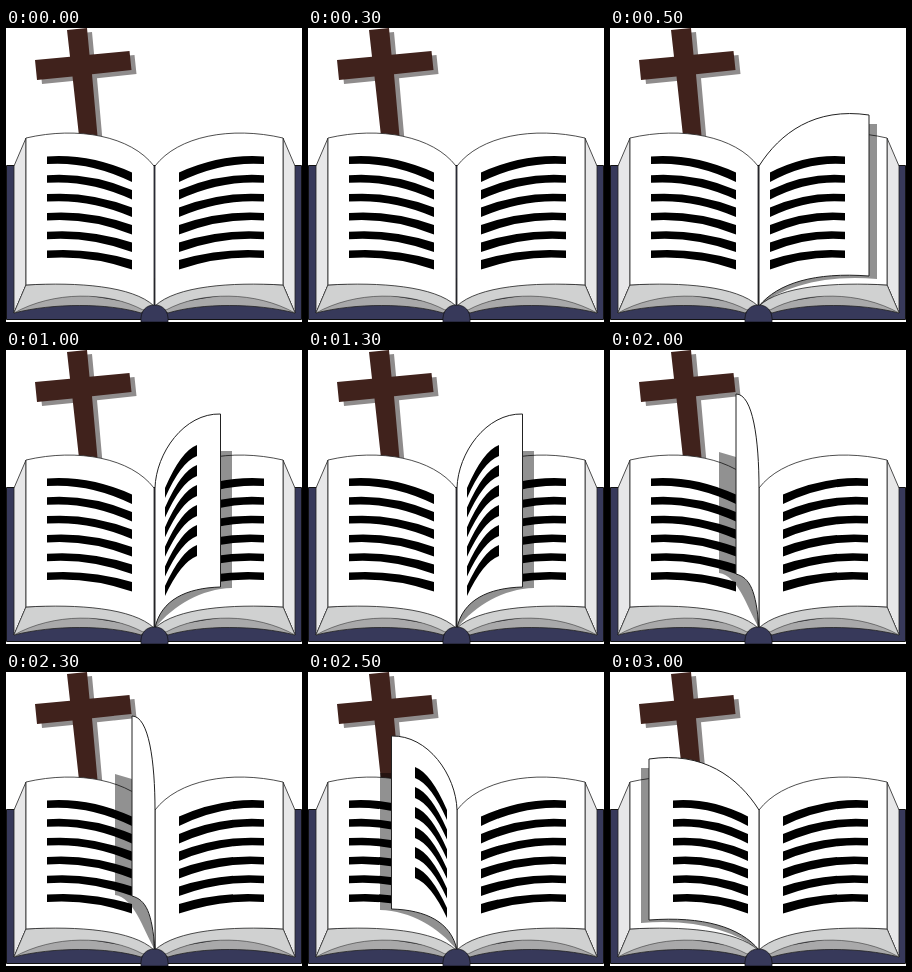
Write an HTML page that moves like this. It is 296x294 px and loops after 3500 ms.

```html
<!DOCTYPE html>
<html lang="en">
<head>
<meta charset="utf-8">
<title>Turning page</title>
<style>
  html, body { margin: 0; width: 100%; height: 100%; overflow: hidden; background: #fff; }
  svg { display: block; width: 100%; height: 100%; }
</style>
</head>
<body>
<svg viewBox="0 0 296 294" stroke-linejoin="round">
  <defs>
    <path id="cross" d="M61 2 81 0 83.5 26.8 123.5 23 125.5 42 86 46.2 91.5 108H73L66.5 48.4 31 52 29 32 64 28.7Z"/>
    <g id="half" stroke="#222" stroke-width=".8">
      <path fill="#e7e7e8" d="M277 110 289 138V285L277 257Z"/>
      <path fill="#a9a9aa" d="M277 257 289 285C250 275 195 275 162 285L149 278Z"/>
      <path fill="#d0d1d1" stroke-width=".5" d="M277 257 289 285C250 263 195 263 160 282L149 278V250Z"/>
      <path fill="#fff" d="M149 138C172 108 225 98 277 110V257C225 254 170 258 149 278Z"/>
    </g>
  </defs>
  <use href="#cross" x="5" y="4" fill="#8f8c8c"/>
  <use href="#cross" fill="#40221c"/>
  <path fill="#37395a" stroke="#111" d="M.5 137.5H295.5V291.5H.5Z"/>
  <use href="#half"/>
  <use href="#half" transform="matrix(-1 0 0 1 297 0)"/>
  <g id="text"></g>
  <g id="leaf"></g>
  <path fill="#37395a" stroke="#111" stroke-width=".7" d="M135 294C134 283 140 277 148.5 277S163 283 162 294Z"/>
</svg>
<script>
const STEP = 500, STEPS = 7;
const mirror = 'matrix(-1 0 0 1 298 0)';
const text = document.getElementById('text');
const leaf = document.getElementById('leaf');

// Six curved bars from the spine side to the outer side; each end is { y, gap, thick }.
function lines(from, to, inner, outer, lift) {
  const mid = (from + to) / 2;
  let d = '';
  for (let i = 0; i < 6; i++) {
    const a = inner.y + i * inner.gap;
    const b = outer.y + i * outer.gap;
    d += `M${from} ${a}Q${mid} ${b + lift} ${to} ${b}v${outer.thick}` +
         `Q${mid} ${b + lift + outer.thick} ${from} ${a + inner.thick}Z`;
  }
  return `<path d="${d}"/>`;
}

const flatLines = (from, to) => lines(from, to,
  { y: 144.5, gap: 17.5, thick: 9.5 }, { y: 128.5, gap: 18.8, thick: 7.5 }, -3);

text.innerHTML = flatLines(173, 258) + `<g transform="${mirror}">${flatLines(172, 257)}</g>`;

// Leaf outlines, from nearly flat to nearly upright.
const poses = [
  {
    page: 'C170 105 205 79 259 87V248C205 244 168 255 149 278Z',
    shadow: 'L259 96H267V251C215 246 172 259 149 278Z',
    bars: flatLines(160, 235)
  },
  {
    page: 'C150 103 178 63 214.5 64V237C180 238 155 250 149 278Z',
    shadow: 'L214 101H226V238C195 239 168 255 149 278Z',
    bars: lines(159, 191, { y: 138, gap: 19.6, thick: 10 }, { y: 95, gap: 20, thick: 11 }, 6)
  },
  {
    page: 'C149 90 155 44 172 44V224C158 228 152 240 149 278Z',
    shadow: 'L172 107 189 102V223C170 226 162 255 149 278Z',
    bars: ''
  }
].map(({ page, shadow, bars }) =>
  `<path fill-opacity=".43" d="M149 138${shadow}"/>` +
  `<path fill="#fff" stroke="#222" d="M149 138${page}"/>${bars}`);

let shown = -1;
function draw(now) {
  const step = Math.floor(now / STEP) % STEPS;
  if (step !== shown) {
    shown = step;
    const turned = step > 3;
    leaf.innerHTML = step ? poses[turned ? 6 - step : step - 1] : '';
    leaf.setAttribute('transform', turned ? mirror : '');
  }
  requestAnimationFrame(draw);
}
draw(performance.now());
</script>
</body>
</html>
```
